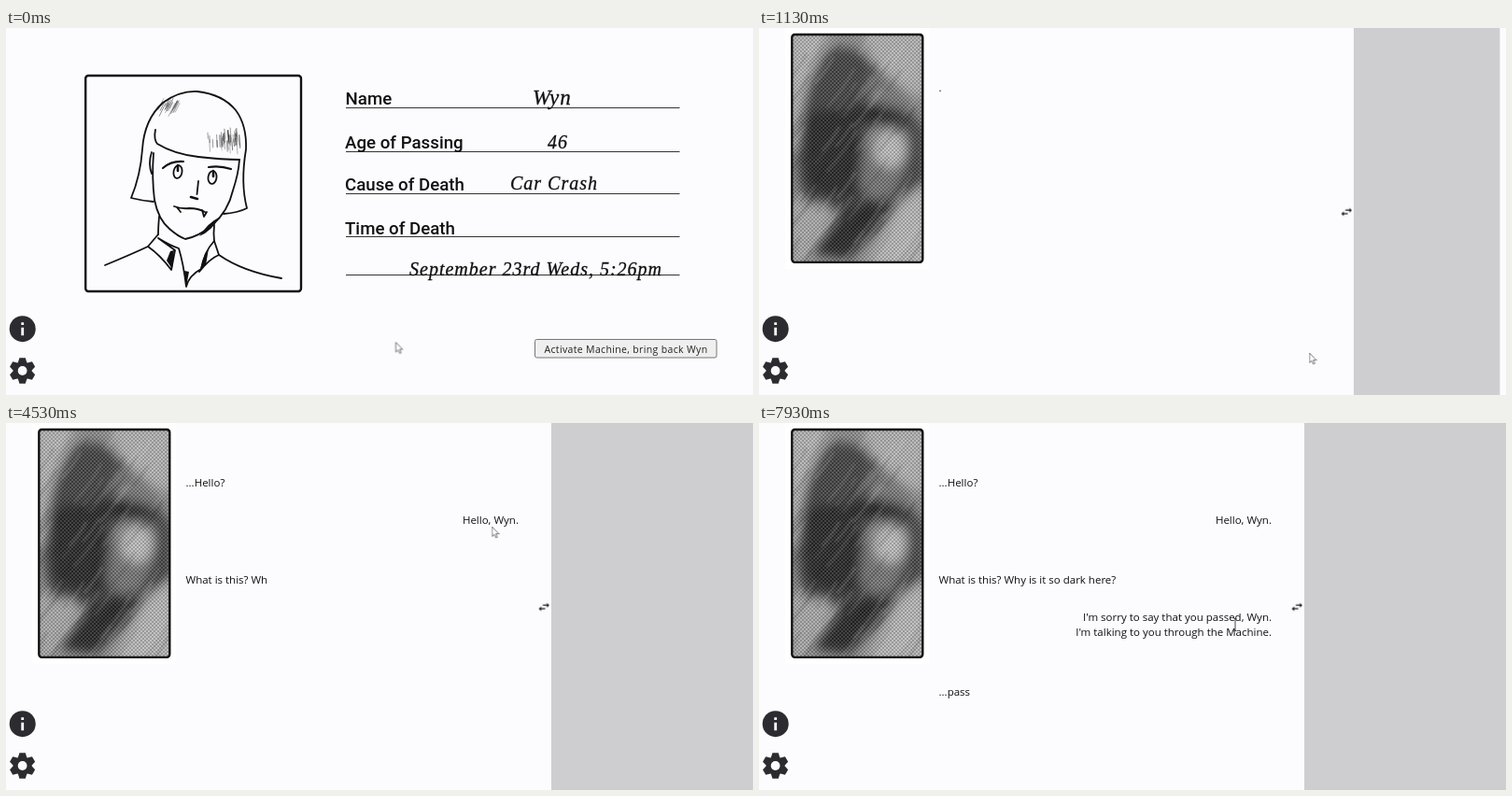
An HTML page for the animation above (8 s loop, 800 px wide and 393 px high).

```html
<!DOCTYPE html>
<html lang="en">
<head>
<meta charset="utf-8">
<title>Bring back Wyn</title>
<style>
html, body { margin: 0; width: 100%; height: 100%; overflow: hidden; background: #fcfbfd; }
svg { display: block; width: 800px; height: 393px; }

.label { font: 500 18.7px Roboto, sans-serif; fill: #111; }
.hand { font: italic 20px "Liberation Serif", serif; letter-spacing: 1px; fill: #111; stroke: #111; stroke-width: .3; }
.say { font: 11.5px "Open Sans", "Noto Sans", sans-serif; fill: #111; }
.end { text-anchor: end; }
.btn rect { fill: #efeff0; stroke: #767676; rx: 2px; }
.btn text { font: 10.5px "Open Sans", "Noto Sans", sans-serif; letter-spacing: .35px; fill: #222; text-anchor: middle; }
.rule { stroke: #333; stroke-width: 1; }
.ink { fill: none; stroke: #111; stroke-width: 1.8; stroke-linecap: round; stroke-linejoin: round; }
.pointer { fill: #fff; stroke: #666; stroke-width: .9; stroke-linejoin: round; }

/* One shared 8 s clock: 1% = 80 ms */
.cut, .move { animation: 8s linear infinite; }
.cut { animation-timing-function: step-end; }

#record { animation-name: record; }
#card { animation-name: shift; }
#wake { animation-name: wake; }
#wake rect { animation-name: wakeHover; }
#chat { animation-name: chat; }
#panel { animation-name: panel; }
#swap { animation-name: swap; }
#greet { animation-name: greet; }
#greet rect { animation-name: greetHover; }
#greeted { animation-name: greeted; }
#tell { animation-name: tell; }
#tell rect { animation-name: tellHover; }
#told { animation-name: told; }
#cursor { animation-name: cursor; }
#arrow { animation-name: arrow; }
#finger { animation-name: finger; }
#beam { animation-name: beam; }

@keyframes record { 0% { visibility: visible } 12.5%, 100% { visibility: hidden } }
@keyframes chat { 0% { visibility: hidden } 12.5%, 100% { visibility: visible } }
@keyframes shift {
  0%, 8.375% { transform: translate(0, 0); animation-timing-function: ease-out }
  10.8%, 100% { transform: translate(-10.4px, 0) }
}
@keyframes wake { 0% { opacity: 1 } 8.375%, 100% { opacity: 0 } }
@keyframes wakeHover { 0% { fill: #efeff0 } 5.4%, 100% { fill: #e4e4e5 } }
@keyframes panel {
  0%, 12.1% { transform: translate(776px, 0) scale(0, 1); animation-timing-function: cubic-bezier(.2, .62, .35, 1) }
  18.375%, 100% { transform: translate(584px, 0) scale(1, 1) }
}
@keyframes swap {
  0%, 8.375% { opacity: 0; transform: translate(768.8px, 197px) }
  10.8% { opacity: 1; transform: translate(768.8px, 197px) }
  12.1% { opacity: 1; transform: translate(768.8px, 197px); animation-timing-function: cubic-bezier(.2, .62, .35, 1) }
  18.375%, 100% { opacity: 1; transform: translate(576.2px, 197px) }
}
@keyframes greet { 0% { opacity: 0 } 30.8% { opacity: .5 } 31.6% { opacity: 1 } 42.5%, 100% { opacity: 0 } }
@keyframes greetHover { 0% { fill: #efeff0 } 38.8%, 100% { fill: #e4e4e5 } }
@keyframes greeted { 0% { opacity: 0 } 42.5%, 100% { opacity: 1 } }
@keyframes tell { 0% { opacity: 0 } 75% { opacity: .5 } 75.8% { opacity: 1 } 85.8%, 100% { opacity: 0 } }
@keyframes tellHover { 0% { fill: #efeff0 } 80.7%, 100% { fill: #e4e4e5 } }
@keyframes told { 0% { opacity: 0 } 85.8%, 100% { opacity: 1 } }
@keyframes cursor {
  0%, .8% { transform: translate(417.5px, 336.5px); animation-timing-function: ease-in-out }
  7% { transform: translate(589.5px, 348px) }
  26.6% { transform: translate(589.5px, 348px) }
  27.5% { transform: translate(588.5px, 346px) }
  33.2% { transform: translate(588.5px, 346px); animation-timing-function: ease-in-out }
  39% { transform: translate(520.5px, 111px) }
  76.4% { transform: translate(520.5px, 111px); animation-timing-function: ease-in-out }
  82.5%, 100% { transform: translate(510px, 216px) }
}
@keyframes arrow {
  0% { opacity: 1 } 5.4% { opacity: 0 } 8.375% { opacity: 1 }
  38.8% { opacity: 0 } 44.1% { opacity: 1 } 80.7%, 100% { opacity: 0 }
}
@keyframes finger {
  0% { opacity: 0 } 5.4% { opacity: 1 } 8.375% { opacity: 0 }
  38.8% { opacity: 1 } 44.1% { opacity: 0 } 80.7% { opacity: 1 } 86.5%, 100% { opacity: 0 }
}
@keyframes beam { 0% { opacity: 0 } 86.5%, 100% { opacity: 1 } }
</style>
</head>
<body>
<svg viewBox="0 0 800 393">
  <defs>
    <filter id="soft" x="-30%" y="-30%" width="160%" height="160%"><feGaussianBlur stdDeviation="6"/></filter>
    <filter id="smear"><feGaussianBlur stdDeviation="1.1"/></filter>
    <clipPath id="photoBox"><rect x="35" y="7" width="140.500" height="244" rx="3"/></clipPath>
    <pattern id="weave" width="4" height="4" patternUnits="userSpaceOnUse">
      <path d="M0 0h2v2H0zM2 2h2v2H2z" fill="#000" opacity=".17"/>
      <path d="M2 0h2v2H2zM0 2h2v2H0z" fill="#fff" opacity=".12"/>
    </pattern>
  </defs>

  <g id="record" class="cut">
    <g id="card" class="move">
      <rect x="85.200" y="51" width="230.800" height="231" rx="3" fill="none" stroke="#111" stroke-width="2.400"/>
      <g class="ink">
        <path d="M158 186Q146 185 134 182Q144 158 146 130Q148 98 168 80Q186 67 205 68Q232 71 246 88Q258 104 257 130Q251 166 258 193Q248 198 233 199"/>
        <path d="M160 109Q158 119 162 124Q180 135 206 138Q232 141 250 141"/>
        <path d="M156 133Q152 145 156 156M158 134Q156 160 159 184Q163 205 175 215Q184 223 192 226Q207 223 221 211Q238 196 243 174Q249 156 250 141"/>
        <path d="M168 150Q177 142 190 143M217 149Q229 147 241 151" stroke-width="2.200"/>
        <ellipse cx="184" cy="154" rx="4.500" ry="7" transform="rotate(10 184 154)"/>
        <ellipse cx="221" cy="160" rx="4.500" ry="7" transform="rotate(8 221 160)"/>
        <path d="M184 147v6M222 153v6" stroke-width="2.600"/>
        <path d="M206 164L204.500 178"/>
        <path d="M198 181L205 183" stroke-width="2.600"/>
        <path d="M180 191Q189 194 196 193Q206 193 213 197M183 192L187 197M210 195L212 202L215 197"/>
        <path d="M164 202Q163 214 163 221M223 211Q222 220 223 228"/>
        <path d="M163 221L152 234Q165 243 177 259L181 238L163 225Q176 233 185 236Q190 252 193 277Q196 265 209 258Q212 240 223 228L228 243Q218 247 207 261"/>
        <path d="M152 234Q135 242 106 254M228 243Q254 261 295 268"/>
      </g>
      <path d="M207 223Q217 208 228 203Q221 217 207 223ZM176 239L180 238L178 258L172 249ZM213 242L217 236L214 254L208 258ZM191 260L196 261L193 277Z" fill="#111"/>
      <g id="hatch" stroke="#111" stroke-linecap="round"></g>

      <g class="rule">
        <path d="M364 85.500H721.500M364 132.500H721.500M364 177.500H721.500M364 223.500H721.500M364 264.500H721.500"/>
      </g>
      <g class="label">
        <text x="363.500" y="82">Name</text>
        <text x="363" y="128.500">Age of Passing</text>
        <text x="363" y="174">Cause of Death</text>
        <text x="363" y="220.500">Time of Death</text>
      </g>
      <g class="hand">
        <text x="564" y="82" style="font-size:23px">Wyn</text>
        <text x="580" y="129">46</text>
        <text x="540" y="173">Car Crash</text>
        <text x="432" y="265">September 23rd Weds, 5:26pm</text>
      </g>
    </g>
    <g id="wake" class="btn cut">
      <rect class="cut" x="566.500" y="333.500" width="194.500" height="19.500"/>
      <text x="664" y="347.500">Activate Machine, bring back Wyn</text>
    </g>
  </g>

  <g id="chat" class="cut">
    <rect x="28" y="0" width="154" height="258" fill="#fff"/>
    <g clip-path="url(#photoBox)">
      <rect x="35" y="6" width="141" height="246" fill="#8e8e8e"/>
      <g filter="url(#soft)">
        <path d="M30 0H75L52 70L38 130H30Z" fill="#b4b4b4"/>
        <path d="M112 0H180V75L125 60Z" fill="#b2b2b2"/>
        <path d="M68 30Q90 10 116 32Q140 50 165 92L178 110V165L150 185L120 215L60 195Q36 180 42 120Q46 60 68 30Z" fill="#454545"/>
        <path d="M120 50Q150 45 172 95Q140 80 112 78Z" fill="#7c7c7c"/>
        <path d="M48 95Q70 78 105 95Q118 140 112 175Q80 195 48 165Z" fill="#2c2c2c"/>
        <path d="M92 84Q130 74 162 98Q130 106 95 104Z" fill="#292929"/>
        <path d="M112 108Q140 98 162 112Q160 160 140 182Q122 190 108 170Z" fill="#767676"/>
        <ellipse cx="140" cy="130" rx="17" ry="20" fill="#bdbdbd"/>
        <path d="M70 205Q110 180 148 188L128 215L95 248L50 240Z" fill="#2b2b2b"/>
        <path d="M30 190L68 188L84 200L42 258H30Z" fill="#a9a9a9"/>
        <path d="M150 190L180 165V258H112Z" fill="#b8b8b8"/>
      </g>
      <g id="streaks" filter="url(#smear)"></g>
      <rect x="35" y="6" width="141" height="246" fill="url(#weave)"/>
    </g>
    <rect x="35.300" y="7" width="140" height="243.800" rx="3" fill="none" stroke="#0b0b0b" stroke-width="2.300"/>

    <g class="say">
      <text id="line1" x="192.500" y="68"></text>
      <text id="greeted" class="end cut" x="549" y="108">Hello, Wyn.</text>
      <text id="line2" x="192.500" y="172"></text>
      <g id="told" class="end cut">
        <text x="549" y="212">I'm sorry to say that you passed, Wyn.</text>
        <text x="549" y="228">I'm talking to you through the Machine.</text>
      </g>
      <text id="line3" x="192.500" y="292"></text>
    </g>
    <g id="greet" class="btn cut">
      <rect class="cut" x="470.500" y="93.500" width="78" height="19"/>
      <text x="509.700" y="107">Hello, Wyn.</text>
    </g>
    <g id="tell" class="btn cut">
      <rect class="cut" x="328.500" y="197" width="220" height="35.500"/>
      <text x="438.700" y="211">I'm sorry to say that you passed, Wyn.</text>
      <text x="438.700" y="227">I'm talking to you through the Machine.</text>
    </g>
  </g>

  <rect id="panel" class="move" width="216" height="393" fill="#cecdcf"/>
  <g id="swap" class="move">
    <path transform="scale(.62) translate(-12 -12)" d="M7 11L3 15l4 4v-3h7v-2H7zM21 9l-4-4v3h-7v2h7v3z" fill="#111"/>
  </g>

  <g fill="#2c2c30">
    <circle cx="17.700" cy="322.200" r="14"/>
    <path d="M16.300 315.200h2.800v2.800h-2.800zM16.300 320.700h2.800v8.500h-2.800z" fill="#fff"/>
    <g id="gear" transform="translate(17.600 367)"><circle r="9.800"/></g>
    <circle cx="17.600" cy="367" r="4.900" fill="#fcfbfd"/>
  </g>

  <g id="cursor" class="move">
    <path id="arrow" class="pointer cut" d="M0 0V10.500L2.400 8.300L4.200 12L5.800 11.200L4.100 7.700H7.300Z"/>
    <path id="finger" class="pointer cut" d="M-1 6.500V.8Q0-.8 1 .8V4.500Q2.200 3.500 3 5Q4.200 4.200 4.800 5.600Q6 5.200 6 7V9Q6 11 5 12.500H-.5Q-2.500 10-4 7.500Q-3.500 6-2 7.200L-1 8.200Z"/>
    <path id="beam" class="cut" d="M-1.500-6.500H1.500M0-6.500V6.500M-1.500 6.500H1.500" fill="none" stroke="#333" stroke-width=".9"/>
  </g>
</svg>
<script>
const $ = id => document.getElementById(id);

let seed = 11;
const rand = (lo, hi) => {
  seed = (seed * 16807) % 2147483647;
  return lo + (hi - lo) * seed / 2147483647;
};

function add(parent, tag, attrs) {
  const el = document.createElementNS('http://www.w3.org/2000/svg', tag);
  for (const k in attrs) el.setAttribute(k, attrs[k]);
  $(parent).append(el);
}

function hatch(count, x0, x1, y0, y1, lean) {
  for (let i = 0; i < count; i++) {
    const x = rand(x0, x1), y = rand(y0, y1), len = rand(6, 14);
    add('hatch', 'path', { d: `M${x} ${y}l${lean * len} ${len}`, 'stroke-width': .6, opacity: rand(.4, .9) });
  }
}
hatch(20, 168, 186, 75, 82, -.5);
hatch(12, 216, 234, 112, 121, .05);
hatch(34, 230, 250, 107, 122, .08);

for (let i = 0; i < 90; i++) {
  const len = rand(18, 46);
  add('streaks', 'path', {
    d: `M${rand(30, 178)} ${rand(0, 240)}q${-len * .25} ${len * .5} ${-len * .7} ${len}`,
    fill: 'none', stroke: i % 2 ? '#fff' : '#000', 'stroke-width': rand(1.5, 4), opacity: rand(.05, .16)
  });
}

for (let a = 0; a < 360; a += 60)
  add('gear', 'path', { d: 'M-5-8L-3.200-13.800H3.200L5-8Z', transform: `rotate(${a})` });

// Typing: a rest after each stop, and after the letter that follows an ellipsis
function typed(id, text, start) {
  let t = start;
  const times = [...text].map((c, i) => {
    const at = t;
    t += '.?'.includes(c) ? 200 : i === 3 && text.startsWith('...') ? 260 : 60;
    return at;
  });
  return { el: $(id), text, times };
}
const lines = [
  typed('line1', '...Hello?', 1070),
  typed('line2', 'What is this? Why is it so dark here?', 3460),
  typed('line3', '...pass', 6920)
];

// Share the clock of the CSS animations so that typing stays in step
const clock = $('panel').getAnimations()[0];
function draw() {
  const t = (clock.currentTime || 0) % 8000;
  for (const { el, text, times } of lines) {
    const shown = text.slice(0, times.filter(at => at <= t).length);
    if (el.textContent !== shown) el.textContent = shown;
  }
  requestAnimationFrame(draw);
}
draw();
</script>
</body>
</html>
```
